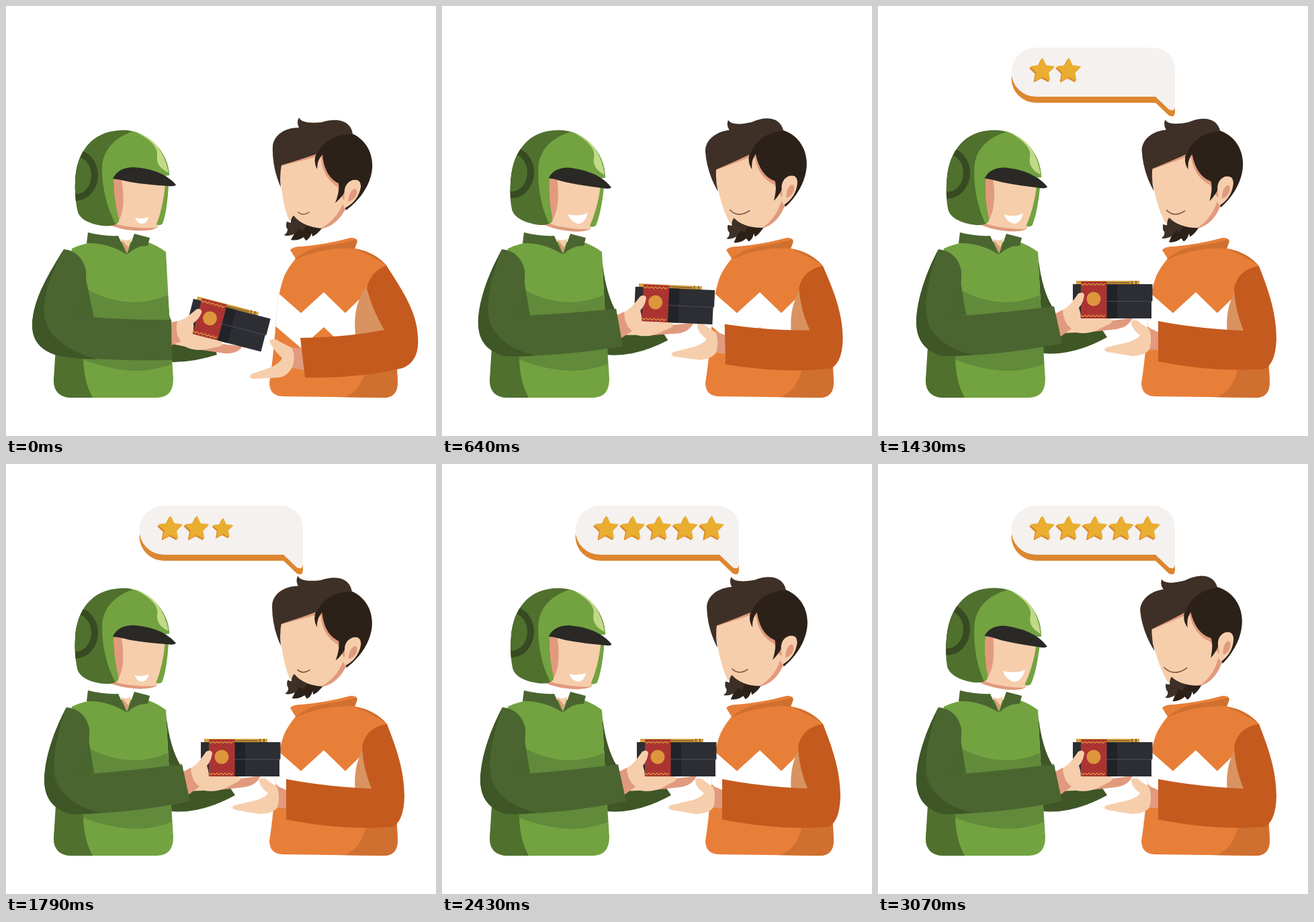
An HTML page for the animation above (3570 ms loop, 640 by 640 pixels).

```html
<!DOCTYPE html>
<html lang="en">
<head>
<meta charset="utf-8">
<title>Delivery review</title>
<style>
  html, body { margin: 0; width: 100%; height: 100%; overflow: hidden; background: #fff; }
  svg { display: block; width: 100vw; height: 100vh; }
  .leaf { fill: #72a340; } .moss { fill: #618a3b; } .fern { fill: #50702e; }
  .sleeve { fill: #4b6530; } .deep { fill: #3f5627; }
  .skin { fill: #f6ceac; } .blush { fill: #e19a7d; }
  .orange { fill: #e87f38; } .rust { fill: #cf7030; } .brick { fill: #c55a1e; }
  .brown { fill: #3e3026; } .dark { fill: #2c2119; }
  .gold { fill: #d6a040; }
</style>
</head>
<body>
<svg viewBox="0 0 640 640">
  <defs>
    <path id="shell" d="M168 318 Q168 327 150 327.500 C126 326 111 318 107 307 Q102 288 103 262 C104 222 124 187 170 185 C207 182 242 215 243 252 L160 258 Q160 290 168 318Z"/>
    <clipPath id="shellClip"><use href="#shell"/></clipPath>
    <path id="torsoB" d="M423 363 Q427 358 440 358 Q478 355 513 345 Q525 345 522 353 L519 361 Q549 366 567 387 L581 520 L583 560 Q583 583 562 583 L412 581 Q392 580 392 561 Q397 530 401 480 Q404 425 415 400 Q421 388 431 376Z"/>
    <clipPath id="torsoBClip"><use href="#torsoB"/></clipPath>
    <path id="balloon" d="M235 62 H404 Q442 62 442 99 V150 Q441 158 433 154 L413 135 H235 A36.500 36.500 0 0 1 235 62Z"/>
  </defs>

  <!-- rider -->
  <path class="deep" data-a="M238 400 Q241 430 243 460 L255 500 L312 512 L314 519 Q280 530 246 530Z"
                     data-b="M238 370 Q243 420 259 447 L270 478 L333 481 L341 493 Q290 521 246 517Z"/>
  <path class="leaf" d="M98 361 Q120 351 140 351 H210 Q226 357 238 366 L243 460 L249 555 Q249 583 224 583 H97 Q71 582 71 557 L75 510Z"/>
  <path class="moss" d="M112 416 Q150 441 192 441 Q219 440 241 430 L247 533 Q220 543 190 543 Q145 540 110 524Z"/>
  <path class="fern" d="M74 508 L115 515 Q114 556 129 583 H97 Q71 582 71 557Z"/>
  <path class="skin" d="M171 347 Q180 351 187 346 L180 366Z"/>
  <path class="blush" d="M171 347 L183 360 L180 367Z"/>
  <path class="sleeve" d="M122 337 Q145 343 167 342 L180 370 Q152 352 120 353Z M191 339 L214 345 L211 357 Q194 356 180 370Z"/>

  <g id="riderHead">
    <path class="blush" d="M150 256 L236 266 L225 330 Q213 336 190 334 Q172 333 154 326 Q150 300 150 256Z"/>
    <path class="skin" d="M172 259 L239 266 Q236 303 224 330 Q193 332 164 325 Q180 306 172 259Z"/>
    <use href="#shell" class="fern"/>
    <g clip-path="url(#shellClip)">
      <ellipse cx="104" cy="252" rx="33" ry="38" fill="#374a22"/>
      <ellipse cx="104" cy="252" rx="23" ry="28" class="fern"/>
      <path class="leaf" d="M194 185 C162 194 142 215 143 245 C144 282 154 308 165 328 L175 318 L170 255 H250 V180Z"/>
    </g>
    <path fill="#c1da87" d="M194 188 Q232 199 242 248 Q222 239 225 222 Q227 205 194 188Z"/>
    <path class="leaf" d="M237 265 L242 266 Q240 305 233 324 Q228 328 224 325 Q234 300 237 265Z"/>
    <path fill="#2a2925" d="M159 257 Q167 240 190 240 Q233 243 253 266 Q251 269 243 268 Q210 266 185 262 Q168 258 159 257Z"/>
    <path fill="#fff" data-mood data-a="M192 315 Q202 318 212 314 Q209 324 203 324 Q195 324 192 315Z"
                                   data-b="M190 307 Q207 311 223 303 Q219 322 207 322 Q195 320 190 307Z"/>
  </g>

  <!-- customer -->
  <use href="#torsoB" class="orange"/>
  <g clip-path="url(#torsoBClip)">
    <path fill="#fff" d="M395 418 L406 428 L439 457 L473 426 L505 457 L540 423 V474 L505 508 L473 478 L439 509 L404 479 L395 471Z"/>
    <path fill="#d89360" d="M540 414 Q515 441 520 490 L570 490Z"/>
    <path class="rust" d="M500 583 C522 576 533 560 537 530 L590 520 V590Z"/>
    <path class="rust" d="M429 378 Q450 359 482 356 Q508 352 525 346 L520 361 Q474 358 429 378Z"/>
    <path class="rust" d="M515 360 Q554 364 569 388 Q546 372 515 360Z"/>
  </g>

  <g id="customerHead">
    <path class="blush" d="M408 235 L470 218 L500 262 L512 262 L516 292 Q508 297 500 311 Q486 330 466 332 Q430 325 421 316 Q408 280 408 235Z"/>
    <path class="skin" d="M409 238 Q442 230 463 224 L469 226 Q471 255 493 269 L503 290 Q492 320 466 332 Q433 327 421 318 Q408 286 409 238Z"/>
    <path class="dark" d="M463 243 Q455 228 466 212 Q482 190 513 189 C536 198 547 220 545 242 C543 265 528 288 506 304 L504 296 L512 262 Q503 283 490 293 Q497 275 495 264 Q474 254 471 221 Q463 229 463 243Z"/>
    <path class="skin" d="M504 285 Q501 264 516 259 Q529 257 528 270 Q524 291 504 301 L501 294Z"/>
    <path class="blush" d="M509 291 Q510 277 518 272 Q525 272 521 282 Q517 290 509 291Z"/>
    <path class="brown" d="M409 270 C400 250 396 228 397 208 C399 192 415 181 436 181 Q432 173 436 166 Q440 176 470 173 C495 165 514 172 516 191 Q478 190 463 220 Q440 228 410 237 Q407 252 409 270Z"/>
    <path class="dark" d="M428 312 Q442 329 470 331 Q463 340 456 343 L455 338 Q452 347 446 349 L443 344 Q434 350 424 348 L429 339 Q421 343 414 341 Q420 337 419 332 Q416 329 418 321 L424 323 Q424 316 428 312Z"/>
    <path class="brown" d="M428 312 Q436 323 447 327 L441 335 L436 331 L430 339 Q421 343 414 341 Q420 337 419 332 Q416 329 418 321 L424 323 Q424 316 428 312Z"/>
    <path fill="none" stroke="#7d503b" stroke-width="1.500" stroke-linecap="round" data-mood
          data-a="M435 307 Q442 313 451 307" data-b="M419 296 Q431 313 453 302"/>
  </g>

  <path class="skin" data-a="M392 498 Q400 493 408 500 L428 510 L440 512 L445 542 L426 538 Q418 552 406 553 L368 555 Q359 553 365 548 L396 537 Q409 530 411 524 Q396 510 392 498Z"
                     data-b="M377 469 Q385 465 392 473 L406 482 L419 487 L420 512 L404 511 Q398 520 378 521 L342 515 Q333 512 340 508 L374 500 Q387 495 390 490 Q376 480 377 469Z"/>
  <path class="blush" data-a="M425 508 L440 510 L445 542 L426 538 Q432 520 425 508Z"
                      data-b="M403 479 L419 486 L420 513 L404 511 Q409 494 403 479Z"/>
  <path class="brick" data-a="M566 386 C588 420 612 455 613 492 Q616 529 590 539 Q530 554 445 553 L438 494 Q510 493 563 482 Q545 452 537 420 Q542 396 566 386Z"
                      data-b="M567 387 C580 420 593 455 593 495 Q592 531 576 540 Q500 546 417 529 L417 469 Q480 481 544 483 Q531 452 530 420 Q536 392 567 387Z"/>

  <!-- parcel, drawn level -->
  <g id="parcel">
    <path class="blush" d="M300 475 L379 464 Q373 478 355 481 L318 485Z"/>
    <path class="gold" d="M295 409 H389 V415 H295Z"/>
    <path fill="#8f6a2b" d="M341 411 H375 V413 H341Z M377 409 H379 V414 H377Z M383 409 H385 V414 H383Z"/>
    <path fill="#2d2e33" d="M290 414 H408.500 V439 H407 V465 H296 V439 H290Z"/>
    <path fill="#222328" d="M340 414 H356 V465 H340Z"/>
    <path fill="none" stroke="#4a4b51" d="M340 439.500 H408"/>
    <path fill="#ab3432" d="M302 410 H340.500 V465 H302Z"/>
    <path id="trim" fill="none" stroke="#dd963b" stroke-width="1.300"/>
    <circle cx="321" cy="436" r="10.500" fill="#dd963b"/>
    <path class="skin" d="M262 458 Q276 454 286 444 Q294 434 298 428 Q305 424 307 430 Q306 441 299 449 Q302 457 302 465 L346 465 Q352 468 345 473 L325 483 Q310 489 295 486 L270 487Z"/>
    <path class="blush" d="M260 460 L275 452 Q276 472 288 480 L272 492 L262 486Z"/>
  </g>

  <path fill="#48652d" data-a="M118 402 L131 464 L93 466Z" data-b="M121 398 L131 460 L100 464Z"/>
  <path class="sleeve" data-a="M86 362 Q111 364 119 393 Q122 430 96 458 Q135 467 246 467 L247 527 Q160 529 80 521 Q39 511 39 475 C40 435 66 395 86 362Z"
                       data-b="M90 362 Q117 365 124 393 Q126 435 104 462 Q165 459 262 447 L274 502 Q180 521 95 521 Q57 510 57 470 C58 433 74 392 90 362Z"/>
  <path class="deep" data-a="M86 362 Q48 435 59 470 Q72 508 135 526 Q105 525 80 521 Q39 511 39 475 C40 435 66 395 86 362Z"
                     data-b="M90 362 Q64 435 74 470 Q86 506 140 519 Q115 522 95 521 Q57 510 57 470 C58 433 74 392 90 362Z"/>

  <g id="bubble">
    <use href="#balloon" y="9" fill="#dd8630"/>
    <use href="#balloon" fill="#f4f1ef"/>
  </g>
  <g id="stars"></g>
</svg>

<script>
const FPS = 14, LOOP = 3570, LAST = 43;
// start step and largest scale of each star
const POPS = [[11.7, 1], [16.2, 1.15], [22.6, 1.15], [25.5, 1.15], [30.2, 1]];

const $ = id => document.getElementById(id);
const clamp = v => Math.max(0, Math.min(1, v));
const lerp = (a, b, p) => a + (b - a) * p;

function mixPath(a, b, p) {
  const to = b.match(/-?[\d.]+/g);
  let i = 0;
  return a.replace(/-?[\d.]+/g, n => lerp(+n, +to[i++], p).toFixed(2));
}

function starPoints(outer, inner) {
  return Array.from({ length: 10 }, (_, i) => {
    const r = i % 2 ? inner : outer, a = i * Math.PI / 5 - Math.PI / 2;
    return (r * Math.cos(a)).toFixed(2) + ',' + (r * Math.sin(a)).toFixed(2);
  }).join(' ');
}

function wave(y) {
  let d = `M302 ${y}`;
  for (let x = 305; x <= 340; x += 3) d += `L${x} ${y + (x % 2 ? 2.5 : 0)}`;
  return d;
}

const points = starPoints(17.5, 8.6);
const starShape = (color, x, y) =>
  `<polygon points="${points}" transform="translate(${x} ${y})" fill="${color}" stroke="${color}" stroke-width="2" stroke-linejoin="round"/>`;
$('stars').innerHTML = POPS.map(() =>
  `<g>${starShape('#dd8630', -1, 1.5)}${starShape('#e9ae30', 0.8, -0.5)}</g>`).join('');
$('trim').setAttribute('d', wave(413) + wave(460));

const morphs = [...document.querySelectorAll('[data-a]')];

function popScale(age, peak) {
  const rise = 0.55 + 0.12 * age;
  if (rise <= peak) return rise;
  return Math.max(1, peak - 0.075 * (age - (peak - 0.55) / 0.12));
}

function draw(step) {
  const reach = 1 - Math.pow(1 - clamp(step / 12), 1.25);
  const mood = (1 - Math.cos(step * Math.PI / 14)) / 2;

  for (const el of morphs) {
    const { a, b, mood: smiling } = el.dataset;
    el.setAttribute('d', mixPath(a, b, smiling === undefined ? reach : mood));
  }
  $('riderHead').setAttribute('transform', `rotate(${4.2 * mood} 178 250)`);
  $('customerHead').setAttribute('transform', `rotate(${-9 * mood} 465 257)`);
  $('parcel').setAttribute('transform',
    `translate(${lerp(-19.3, 0, reach)} ${lerp(35.8, 0, reach)}) rotate(${lerp(14.5, 0, reach)} 349 439.5)`);

  const grow = clamp((step - 12) / 5), size = lerp(0.525, 1, grow);
  $('bubble').setAttribute('opacity', grow);
  $('bubble').setAttribute('transform', `translate(320 112) scale(${size}) translate(-320 -112)`);

  POPS.forEach(([start, peak], i) => {
    const star = $('stars').children[i], age = step - start;
    const scale = age < 0 ? 0.55 : popScale(age, peak);
    star.setAttribute('opacity', clamp((scale - 0.55) / 0.29));
    star.setAttribute('transform', `translate(${244 + 39.2 * i} 96.5) scale(${scale})`);
  });
}

const origin = performance.now();
let shown = -1;
function tick() {
  const t = (performance.now() - origin) % LOOP;
  const step = Math.min(LAST, Math.floor((Math.floor(t / 10) * 10 + 5) * FPS / 1000));
  if (step !== shown) draw(shown = step);
  requestAnimationFrame(tick);
}
tick();
</script>
</body>
</html>
```
